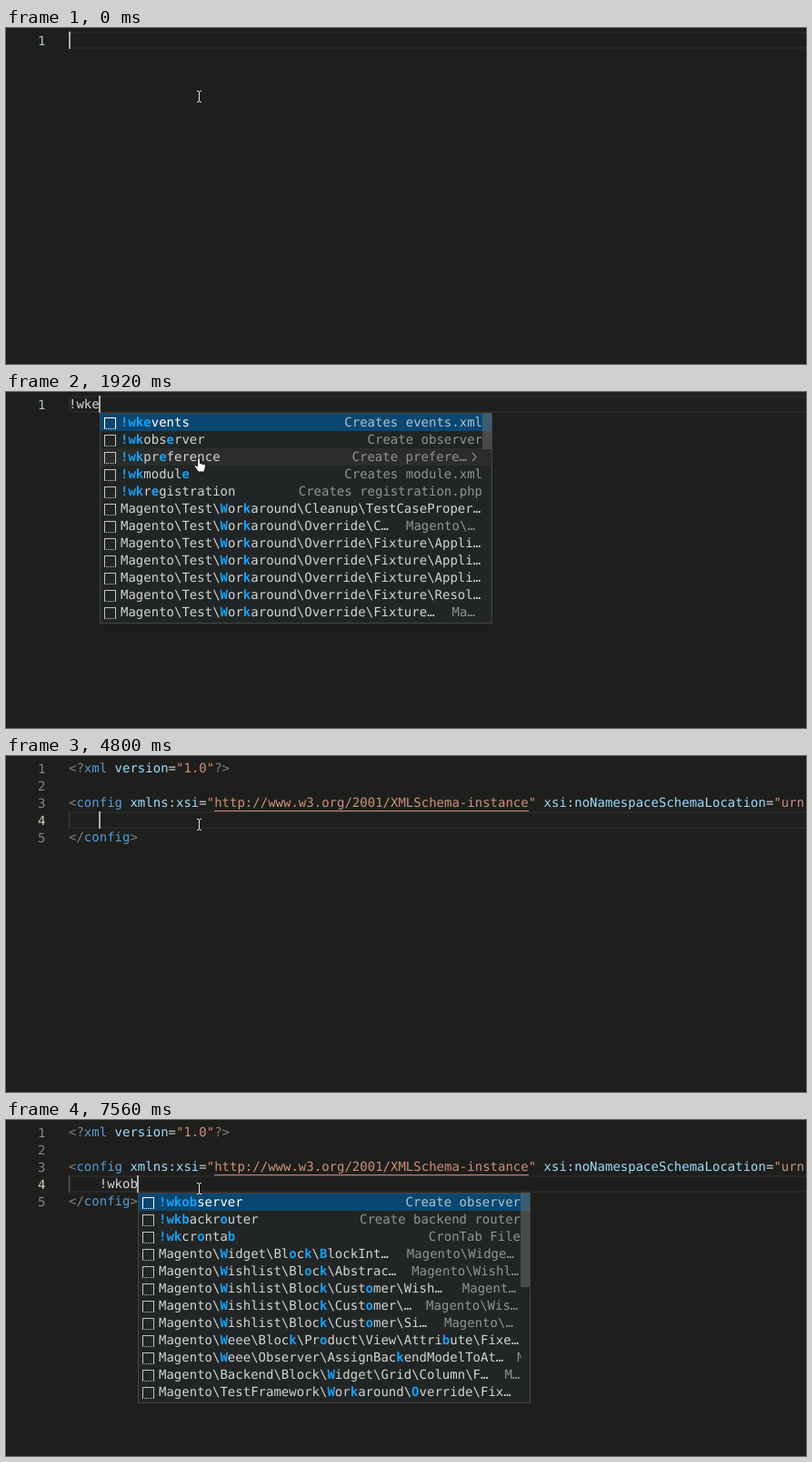
An HTML page with a canvas that plays this animation: 880 px wide and 370 px high, repeating every 8 s.

```html
<!DOCTYPE html>
<html lang="en">
<head>
<meta charset="utf-8">
<title>Editor snippets</title>
<style>
html, body { margin: 0; width: 100%; height: 100%; overflow: hidden; background: #1e1e1c; }
canvas { display: block; width: 880px; height: 370px; }
</style>
</head>
<body>
<canvas id="stage" width="880" height="370"></canvas>
<script>
const ctx = document.getElementById('stage').getContext('2d');
const LOOP = 8000, CHAR = 8.428, ROW = 19, LEFT = 69, TOP = 4;
const FONT = '14px "DejaVu Sans Mono", monospace';
const GREY = '#808080', TAG = '#569cd6', ATTR = '#9cdcfe', STR = '#ce9178', PLAIN = '#d4d4d4';
const M = 'Magento\\';
const WORK = M + 'Test\\[W]or[k]around\\';
const OVER = M + 'Test\\[W]or[k]around\\O[ve]rride\\';

const row = (label, detail = '', gap = 0) => ({ label, detail, gap });

// Snippet rows; the typed prefix is marked with brackets.
const DETAILS = {
  events: 'Creates events.xml', filesignature: 'Insert File Signature',
  frontrouter: 'Create frontend router', layout: 'Layout File',
  module: 'Creates module.xml', observer: 'Create observer',
  plugin: 'Create plugin', preference: 'Create preference',
  registration: 'Creates registration.php'
};
const names = Object.keys(DETAILS);
const snippets = (typed, list) => list.map(n =>
  row('[' + typed + ']' + ('!wk' + n).slice(typed.length), DETAILS[n]));

const webapi = [
  row(M + '[W]ebapi\\Authentication\\R…', M + 'Web…', 19),
  row(M + '[W]ebapi\\Controller\\PathPr…', M + 'Web…', 16),
  row(M + '[W]ebapi\\Controller\\PathProc…', M + '…', 19)
];
const workaround = [
  row(WORK + 'Cleanup\\TestCaseP…', 'Ma…', 16),
  row(WORK + 'Cleanup\\TestCaseProper…'),
  row(WORK + 'Override\\C…', M + '…', 19),
  ...Array(3).fill(row(WORK + 'Override\\Fixture\\Appli…')),
  row(WORK + 'Override\\Fixture\\Resol…'),
  row(WORK + 'Override\\Fixture…', 'Ma…', 19)
];
const overrides = [
  row(OVER + 'C…', M + '…', 19),
  ...Array(3).fill(row(OVER + 'Fixture\\Appli…')),
  row(OVER + 'Fixture\\Resol…'),
  row(OVER + 'Fixture…', 'Ma…', 19)
];

const LISTS = {
  w1: { rows: [...snippets('!w', names.slice(5)), ...webapi, ...workaround.slice(0, 5)], bar: [11, 20] },
  wk1: { rows: [...snippets('!wk', names.slice(5)), ...workaround], bar: [11, 20] },
  wke: {
    rows: [
      row('[!wke]vents', DETAILS.events),
      row('[!wk]obs[e]rver', DETAILS.observer),
      row('[!wk]pr[e]ference', DETAILS.preference),
      row('[!wk]modul[e]', DETAILS.module),
      row('[!wk]r[e]gistration', DETAILS.registration),
      ...workaround.slice(1)
    ],
    bar: [0, 40]
  },
  wkev: {
    rows: [
      row('[!wkev]ents', DETAILS.events),
      row('[!wk]obser[ve]r', DETAILS.observer),
      row(M + '[We]ee\\Bloc[k]\\Product\\[V]iew\\Attribute\\Fixe…'),
      ...overrides,
      row(M + '[We]bapiAsync\\Model\\Bul[k]Ser[v]…', M + '…', 19),
      row(M + 'TestFramework\\[W]or[k]around\\O[ve]r…', 'Magen…', 19),
      row(M + 'TestFramework\\[W]or[k]around\\O[ve]rride\\C…', M, 19)
    ],
    bar: [0, 65]
  },
  w2: { rows: [...snippets('!w', names), ...webapi] },
  wk2: { rows: [...snippets('!wk', names), ...workaround.slice(0, 3)] },
  wkob: {
    rows: [
      row('[!wkob]server', DETAILS.observer),
      row('[!wkb]ackr[o]uter', 'Create backend router'),
      row('[!wk]cr[o]nta[b]', 'CronTab File'),
      row(M + '[W]idget\\Bl[o]c[k]\\[B]lockInt…', M + 'Widge…', 20),
      row(M + '[W]ishlist\\Bl[o]c[k]\\Abstrac…', M + 'Wishl…', 17),
      row(M + '[W]ishlist\\Bloc[k]\\Cust[o]mer\\Wish…', 'Magent…', 22),
      row(M + '[W]ishlist\\Bloc[k]\\Cust[o]mer\\…', M + 'Wis…', 16),
      row(M + '[W]ishlist\\Bloc[k]\\Cust[o]mer\\Si…', M + '…', 19),
      row(M + '[W]eee\\Bloc[k]\\Pr[o]duct\\View\\Attri[b]ute\\Fixe…'),
      row(M + '[W]eee\\Observer\\AssignBac[k]endModelToAt…', M, 15),
      row(M + 'Backend\\Block\\[W]idget\\Grid\\Column\\F…', 'M…', 18),
      row(M + 'TestFramework\\[W]or[k]around\\[O]verride\\Fix…')
    ],
    bar: [0, 104]
  }
};

// time, typed text, list, column of the list
const STEPS = [
  [0, ''], [240, '!'], [1320, '!w'], [1440, '!w', 'w1', 2], [1560, '!wk', 'w1', 2],
  [1680, '!wk', 'wk1', 3], [1800, '!wke', 'wk1', 3], [1920, '!wke', 'wke', 4],
  [2280, '!wkev', 'wkev', 5], [2880, ''], [5280, '!'], [6000, '!w'],
  [6120, '!w', 'w2', 6], [6240, '!wk', 'w2', 6], [6360, '!wk', 'wk2', 7],
  [7080, '!wko', 'wk2', 7], [7440, '!wkob', 'wk2', 7], [7560, '!wkob', 'wkob', 9]
];
const XML_AT = 2880, LINK_AT = 4080, HIDDEN = [[1080, 1320], [3840, 4800]];

const colX = col => LEFT + col * CHAR;
const lineY = line => TOP + (line - 1) * ROW;

function rect(x, y, w, h, color) {
  ctx.fillStyle = color;
  ctx.fillRect(x, y, w, h);
}

function text(s, x, y, color, bold) {
  ctx.font = (bold ? 'bold ' : '') + FONT;
  ctx.fillStyle = color;
  ctx.fillText(s, x, y);
}

// Alternating string/colour pairs along one code line.
function codeLine(line, ...parts) {
  let col = 0;
  for (let i = 0; i < parts.length; i += 2) {
    text(parts[i], colX(col), lineY(line) + 14, parts[i + 1]);
    col += parts[i].length;
  }
}

function drawXml(t) {
  codeLine(1, '<?', GREY, 'xml', TAG, ' version', ATTR, '=', PLAIN, '"1.0"', STR, '?>', GREY);
  codeLine(3, '<', GREY, 'config', TAG, ' xmlns:xsi', ATTR, '=', PLAIN,
    '"http://www.w3.org/2001/XMLSchema-instance"', STR,
    ' xsi:noNamespaceSchemaLocation', ATTR, '=', PLAIN, '"urn:magento:', STR);
  codeLine(5, '</', GREY, 'config', TAG, '>', GREY);
  if (t >= LINK_AT) rect(229, 60, 346, 1, STR);
}

function drawIcon(x, y, color) {
  rect(x, y, 13, 1, color);
  rect(x, y, 1, 13, color);
  rect(x + 12, y, 1, 13, color);
  for (let i = 2; i < 12; i += 2) rect(x + i, y + 12, 1, 1, color);
}

function drawLabel(label, x, y, color) {
  label.split(/[\[\]]/).forEach((part, i) => {
    text(part, x, y, i % 2 ? '#18a0f8' : color, i % 2);
    x += part.length * CHAR;
  });
  return x;
}

function drawList({ rows, bar }, x, y, hovered) {
  rect(x, y, 432, 232, '#454545');
  rect(x + 1, y + 1, 430, 230, '#222525');
  ctx.save();
  ctx.beginPath();
  ctx.rect(x, y, 421.5, 232);
  ctx.clip();
  rows.slice(0, 12).forEach((item, i) => {
    const top = y + 1 + i * ROW, base = top + 14, hover = i === hovered;
    if (!i) rect(x + 1, top, 430, ROW, '#094771');
    if (hover) rect(x + 1, top, 430, ROW, '#2a2d2c');
    drawIcon(x + 5, top + 4, i ? '#c5c5c5' : '#ffffff');
    const end = drawLabel(item.label, x + 23, base, i ? PLAIN : '#ffffff');
    let detail = item.detail, right = x + 421;
    if (hover && detail.length > 15) {
      detail = detail.slice(0, 14) + '…';
      right = x + 404;
    }
    const dx = item.gap ? end + item.gap : right - detail.length * CHAR;
    text(detail, dx, base, i ? '#929492' : '#b0c2cd');
    if (hover) {
      ctx.strokeStyle = '#c5c5c5';
      ctx.lineWidth = 1;
      ctx.beginPath();
      ctx.moveTo(x + 410, top + 5);
      ctx.lineTo(x + 414, top + 9.5);
      ctx.lineTo(x + 410, top + 14);
      ctx.stroke();
    }
  });
  ctx.restore();
  rect(x + 421, y + 1, 10, ROW, '#094771');
  if (hovered >= 0) rect(x + 421, y + 1 + hovered * ROW, 10, ROW, '#2a2d2c');
  if (bar) rect(x + 421, y + bar[0], 10, bar[1], 'rgba(121,121,121,.45)');
}

function drawBeam() {
  rect(212, 70, 1, 11, '#e8e8e8');
  for (const y of [69, 81]) {
    rect(210, y, 2, 1, '#e8e8e8');
    rect(213, y, 2, 1, '#e8e8e8');
  }
}

function drawHand() {
  const hand = new Path2D('M210.5 73.5q1.5-1.5 3 0v5l5 1.2q1.2.4 1 1.8l-.8 4.5-1 2h-6l-4-5.5q-.8-1.8.8-2l2 1.5z');
  ctx.fillStyle = '#ffffff';
  ctx.strokeStyle = '#101010';
  ctx.lineWidth = 1;
  ctx.fill(hand);
  ctx.stroke(hand);
}

function draw(t) {
  const [, typed, list, listCol] = STEPS.filter(s => s[0] <= t).pop();
  const xml = t >= XML_AT, line = xml ? 4 : 1, indent = xml ? 4 : 0;
  const y = lineY(line);

  rect(0, 0, 880, 370, '#1e1e1c');
  ctx.strokeStyle = '#282828';
  ctx.lineWidth = 2;
  ctx.strokeRect(LEFT + 1, y + 1, 830, ROW - 2);
  for (let n = 1; n <= (xml ? 5 : 1); n++) {
    const color = !xml ? '#a4c6d8' : n === line ? '#d0d0c6' : '#858585';
    text(n, 35, lineY(n) + 15, color);
  }
  if (xml) {
    drawXml(t);
    rect(LEFT, y, 1, ROW, t < 5280 ? '#383838' : '#686868');
  }
  text(typed, colX(indent), y + 14, PLAIN);
  if (!HIDDEN.some(([a, b]) => t >= a && t < b))
    rect(Math.floor(colX(indent + typed.length)), y, 2, ROW, '#aeafad');

  if (list) drawList(LISTS[list], Math.round(colX(listCol)), y + ROW, xml ? -1 : 2);
  if (list && !xml) drawHand();
  else drawBeam();
}

ctx.textRendering = 'geometricPrecision';
const start = performance.now();
function tick() {
  draw((performance.now() - start) % LOOP);
  requestAnimationFrame(tick);
}
tick();
</script>
</body>
</html>
```
